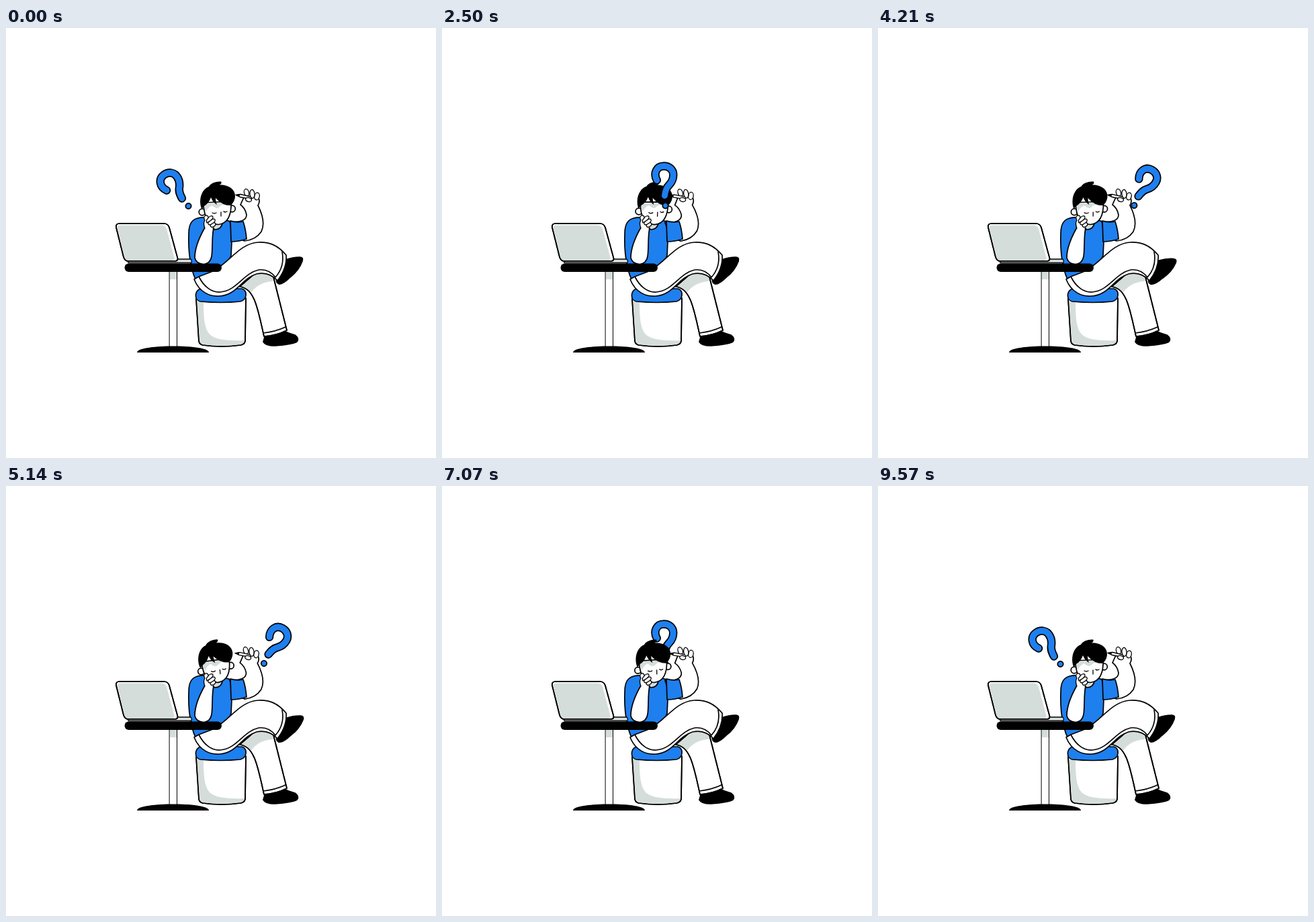
An HTML page that plays this animation: 640 px wide and 640 px high, repeating every 9.64 s.

```html
<!DOCTYPE html>
<html lang="en">
<head>
<meta charset="utf-8">
<title>Thinking at the desk</title>
<style>
html, body { margin: 0; width: 100%; height: 100%; overflow: hidden; background: #fff; }
svg { display: block; width: 100vw; height: 100vh; }
.ink { stroke: #000; stroke-width: 1.7; stroke-linejoin: round; stroke-linecap: round; }
.line { fill: none; }
.white { fill: #fff; }
.blue { fill: #1e7fee; }
.gray { fill: #d5dddb; }
.flat { stroke: none; }
.thin { stroke-width: 1.3; }
</style>
</head>
<body>
<svg viewBox="0 0 640 640">
  <defs>
    <path id="hook" fill="none" stroke-linecap="round" d="M-12.500-38C-18-48-13-59-2-59C6-59 12-53.500 12-46C12-38 9-34 5-30C1-26 0-22-1-15"/>
    <g id="mark">
      <use href="#hook" stroke="#000" stroke-width="12.400"/>
      <use href="#hook" stroke="#1e7fee" stroke-width="9"/>
      <circle class="ink blue" r="4.200"/>
    </g>
  </defs>

  <use id="back" href="#mark"/>

  <g class="ink">
    <!-- stool -->
    <path class="white" d="M283 403L287 466Q288 471 293 472Q321 476 349 472Q355 471 356 466L357 402Z"/>
    <path class="gray flat" d="M284 407H294C294 430 295 447 303 456C311 464 332 466 355 465Q355 470 349 471Q321 475 293 471Q288 470 288 466Z"/>
    <path class="line" d="M283 403L287 466Q288 471 293 472Q321 476 349 472Q355 471 356 466L357 402"/>
    <path class="blue" d="M290 388C280 391 280 405 289 407Q320 410 349 407C359 404 360 391 351 388Z"/>

    <!-- standing leg -->
    <path d="M385 460Q401 458 412 450Q421 455 430 457Q437 462 433 467Q426 471 400 473Q386 473 383 467Z"/>
    <path class="white" d="M348 385C370 387 375 419 384 459Q402 458 418 450L397 366H370Z"/>
    <path class="gray flat" d="M350 385L372 366Q388 362 398 372Q400 376 396 377C382 378 370 385 365 394Q359 387 350 385Z"/>
    <path class="line" d="M348 385C370 387 375 419 384 459Q402 458 418 450L398 371M383 454Q401 452 416 445"/>

    <!-- shirt -->
    <path class="blue" d="M298 282C278 281 272 289 272 306C271 330 274 357 282 374L312 362Q330 352 335 339L336 318L334 288Q321 283 298 282Z"/>

    <!-- crossed leg -->
    <path id="foot" d="M416 345Q427 341 437 341Q443 341 441 347Q436 361 423 371Q412 382 406 381Q401 379 403 372Z"/>
    <path class="white" d="M280 374C288 394 304 400 318 399C345 397 350 373 373 366Q391 362 404 376C412 366 418 352 417 338C405 324 393 318 375 319C347 321 333 349 308 362L287 370Z"/>
    <path class="line" d="M287 370C295 386 307 394 319 393C344 391 353 365 376 360Q391 358 401 371C409 362 414 349 411 333"/>

    <!-- table and laptop -->
    <path class="white" stroke-width="1" d="M243.500 360H254.500V475H243.500Z"/>
    <path class="gray flat" d="M244 362H254V374H244Z"/>
    <path class="flat" d="M195 483C195 476 225 473.500 249 473.500S302 476 302 483Z"/>
    <rect class="flat" x="176.500" y="350.500" width="144.500" height="12.500" rx="6.200"/>
    <path class="gray thin" d="M184 344H274Q277 344 276 349.500H182Q181 346 184 344Z"/>
    <path class="white" d="M169 291H235Q241 291 243 297L255 341Q257 347 251 347H182Q177 347 175 341L164 297Q163 291 169 291Z"/>
    <path class="gray flat" d="M170 293.500H231Q237 293.500 239 299L250 340Q252 346 247 346H182Q178 346 176 341L165.500 298Q165 293.500 170 293.500Z"/>
    <path class="line" d="M169 291H235Q241 291 243 297L255 341Q257 347 251 347H182Q177 347 175 341L164 297Q163 291 169 291Z"/>

    <!-- raised arm -->
    <g id="arm">
      <path class="white" d="M333 288C349 290 358 286 358 278Q356 268 349 263L354 252L375 251Q379 258 375 264C381 276 386 291 380 303C374 312 365 316 355 317L340 310Z"/>
      <g class="white thin">
        <ellipse cx="358" cy="245" rx="3.500" ry="5.500" transform="rotate(-15 358 245)"/>
        <path d="M342 248.500L349 247.500L366 251.500L365 255L348 251.500Z"/>
        <path class="flat" fill="#000" style="fill:#000" d="M341 248.500L348 247L347.500 251.500Z"/>
        <ellipse cx="373.500" cy="250.500" rx="3.700" ry="5.500" transform="rotate(12 373.500 250.500)"/>
        <ellipse cx="366.500" cy="247" rx="3.500" ry="6.500" transform="rotate(-6 366.500 247)"/>
        <ellipse cx="361" cy="255.500" rx="4.500" ry="3" transform="rotate(15 361 255.500)"/>
      </g>
    </g>
    <path class="blue" d="M334 287Q344 290 353 288Q357 300 358 314Q347 318 335 318Z"/>

    <!-- neck -->
    <path class="gray" d="M309 290Q307 299 311 300Q320 300 322 291Z"/>

    <!-- head -->
    <g id="head">
      <circle class="white" cx="292" cy="274" r="4.800"/>
      <circle class="white" cx="336.500" cy="269" r="4.800"/>
      <path class="white" d="M294 260C294 279 300 292 316 292.500C330 291 336 280 335 258Z"/>
      <path class="gray flat" d="M295 262L334 259Q334 263 329 265Q323 260 317 267Q313 270 307 264Q301 266 297 275Z"/>
      <path class="flat" d="M291 269C286 256 291 240 302 236C304 231 313 228 320 228.500Q322 231 318 233.500C331 233 341 240 341 250C341 257 337 262 334 264Q321 264 312 253Q312 258 314 263Q308 260 305 252Q302 261 295 265Q293 268 291 269Z"/>
      <path class="line thin" d="M307 275Q310 277 313 275M324 273Q326 275 329 273M320 274V280"/>
    </g>

    <!-- supporting arm -->
    <path class="white" d="M296 297C288 311 281 329 281 342Q283 351 294 351.500Q304 351 306 340C308 326 306 311 309 298Z"/>
    <path class="white flat" d="M296 288L300 279L312 292L306 300H296Z"/>
    <g class="white thin">
      <ellipse cx="308" cy="293" rx="4.200" ry="2.800" transform="rotate(-35 308 293)"/>
      <ellipse cx="306" cy="288.500" rx="6" ry="2.800" transform="rotate(-35 306 288.500)"/>
      <ellipse cx="302.500" cy="284.500" rx="6.500" ry="2.800" transform="rotate(-38 302.500 284.500)"/>
      <path d="M296 298Q293 291 296 286Q293 281 297 279Q301 278 301 283Q297 286 299 290"/>
    </g>
  </g>

  <use id="front" href="#mark"/>
</svg>
<script>
const $ = id => document.getElementById(id);
const LOOP = 9640, CYCLE = 9570, FPS = 14;
const smooth = u => u * u * (3 - 2 * u);
const swing = (t, count) => (1 - Math.cos(2 * Math.PI * count * t / CYCLE)) / 2;
const headKeys = [[0, 0], [1200, 0], [2600, 2.6], [3600, 2.6], [5600, -6], [7600, 0], [CYCLE, 0]];

function follow(keys, t) {
  const i = Math.max(1, keys.findIndex(k => k[0] >= t));
  const [t0, a] = keys[i - 1], [t1, b] = keys[i];
  return a + (b - a) * smooth((t - t0) / (t1 - t0));
}

function turn(id, angle, x, y) {
  $(id).setAttribute("transform", `rotate(${angle} ${x} ${y})`);
}

function draw(now) {
  const step = Math.floor((now % LOOP + 5) * FPS / 1000);
  const t = Math.min(step * 1000 / FPS, CYCLE);
  const half = CYCLE / 2;
  const p = smooth(1 - Math.abs(1 - t / half));
  const place = `translate(${271.5 + 114.3 * p} ${265 - p}) rotate(${-36 + 67 * p})`;
  for (const id of ["front", "back"]) $(id).setAttribute("transform", place);
  const behind = t > half && t < CYCLE;
  $("front").style.display = behind ? "none" : "";
  $("back").style.display = behind ? "" : "none";

  turn("head", follow(headKeys, t), 315, 293);
  turn("arm", -3.6 * swing(t, 9), 360, 312);
  turn("foot", 8.5 * swing(t, 4), 402, 378);
}

function loop(now) {
  draw(now);
  requestAnimationFrame(loop);
}
draw(0);
requestAnimationFrame(loop);
</script>
</body>
</html>
```
